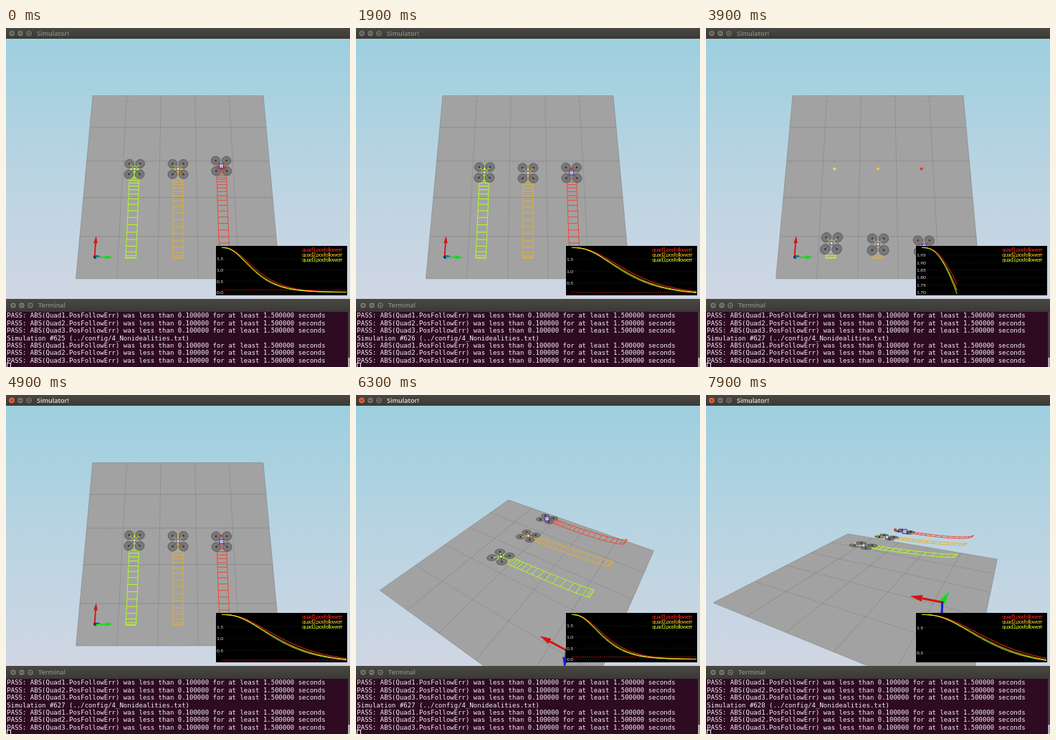
These frames come from a looping animation (480x473 px, 8000 ms). An HTML page with a canvas:

```html
<!DOCTYPE html>
<html lang="en">
<head>
<meta charset="utf-8">
<title>Simulator</title>
<style>
html, body { margin: 0; width: 100%; height: 100%; overflow: hidden; background: #300a24; }
canvas { display: block; }
</style>
</head>
<body>
<canvas id="stage" width="480" height="473"></canvas>
<script>
const ctx = document.getElementById('stage').getContext('2d');
const LOOP = 8000, TAU = Math.PI * 2;
const RUNS = [-2560, 546, 3620, 6797];      // start of each simulation run, ms
const RATE = 0.175, PLOT_W = 174, RUN_MAX = 385;
const FOCUS_AT = 4900;

// time, yaw, ground pitch, flight pitch (degrees)
const CAMERA = [
  [4900, 0, 75.2, 75.2], [5600, 34, 65, 65], [6350, 58, 36, 28],
  [7100, 62.5, 24.5, 15], [7900, 63, 18.8, 10.5]
];
const QUADS = [
  { u: 1, k: 0.0247, sag: 0.08, over: 0.08, hub: 6, color: '#f2452e', plot: '#ff2a1a' },
  { u: 0, k: 0.0265, sag: 0.03, over: 0, hub: 4, color: '#e6b02c', plot: '#ffc81e' },
  { u: -1, k: 0.0275, sag: 0.03, over: 0, hub: 4, color: '#b4ff1e', plot: '#d2ff1e' }
];
// range limit, first tick below 2, step between ticks
const TICKS = [
  [0.12, 0.02, 0.02], [0.35, 0.05, 0.05], [0.7, 0.1, 0.2],
  [1.55, 0.5, 0.5], [1.9, 0.5, 1], [9, 0.5, 0.5]
];

const clamp = x => Math.max(0, Math.min(1, x));
const smooth = x => { x = clamp(x); return x * x * (3 - 2 * x); };

function cameraAt(t) {
  let i = 0;
  while (i < CAMERA.length - 2 && t > CAMERA[i + 1][0]) i++;
  const a = CAMERA[i], b = CAMERA[i + 1];
  const f = clamp((t - a[0]) / (b[0] - a[0]));
  const [yaw, ground, air] = [1, 2, 3].map(j => (a[j] + (b[j] - a[j]) * f) * Math.PI / 180);
  return { ground: projector(yaw, ground), air: projector(yaw, air) };
}

// Orbit camera around the middle target; w is height relative to it.
function projector(yaw, pitch) {
  const c = Math.cos(yaw), s = Math.sin(yaw), cp = Math.cos(pitch), sp = Math.sin(pitch);
  return (u, v, w) => {
    const x = u * c - v * s, y = u * s + v * c;
    const scale = 370 / (6.1 + y * cp - w * sp);
    return [240 + x * scale, 196.5 - (y * sp + w * cp) * scale, scale];
  };
}

function path(points, close) {
  ctx.beginPath();
  points.forEach(p => ctx.lineTo(p[0], p[1]));
  if (close) ctx.closePath();
}
function line(points, color, width) {
  path(points);
  ctx.strokeStyle = color;
  ctx.lineWidth = width;
  ctx.stroke();
}
function dot(x, y, r, color) {
  ctx.beginPath();
  ctx.arc(x, y, r, 0, TAU);
  ctx.fillStyle = color;
  ctx.fill();
}
function text(str, x, y, font, color, align = 'left') {
  ctx.font = font;
  ctx.fillStyle = color;
  ctx.textAlign = align;
  ctx.fillText(str, x, y);
}

// Third-order critically damped approach
const error = (q, s) => { const x = q.k * s; return 2 * (1 + x + x * x / 2) * Math.exp(-x); };
function pose(q, s) {
  const x = q.k * s, e = Math.exp(-x);
  return {
    v: -0.975 * error(q, s) + q.over * smooth((s - 140) / 180),
    w: -q.sag * x * x * e / 0.54,
    tilt: 2.2 * (x - x * x / 2) * e
  };
}

function drawFloor(proj) {
  const at = (u, v) => proj(u, v, -1.07), h = 2.5;
  path([at(-h, h), at(h, h), at(h, -h), at(-h, -h)], true);
  ctx.fillStyle = '#a2a2a2';
  ctx.fill();
  ctx.strokeStyle = '#8f9092';
  ctx.lineWidth = 0.8;
  ctx.stroke();
  for (let g = -1.5; g < 2; g++) {
    line([at(-h, g), at(h, g)], 'rgba(112,112,112,.6)', 0.7);
    line([at(g, -h), at(g, h)], 'rgba(112,112,112,.45)', 0.7);
  }
}

function drawTrail(proj, q, s) {
  const left = [], right = [];
  const add = r => {
    const p = pose(q, r);
    left.push(proj(q.u - 0.11, p.v, p.w));
    right.push(proj(q.u + 0.11, p.v, p.w));
  };
  for (let r = 0; r < s - 10; r += 11) add(r);
  left.forEach((p, i) => line([p, right[i]], q.color, 1));
  line(left, q.color, 0.9);
  line(right, q.color, 0.9);
}

function drawQuad(proj, q, s) {
  const { v, w, tilt } = pose(q, s);
  const c = Math.cos(tilt), n = Math.sin(tilt);
  const at = (du, dv) => proj(q.u + du, v + dv * c, w - dv * n);
  const hub = at(0, 0), arm = 0.125;
  for (const dv of [arm, -arm]) for (const du of [-arm, arm]) {
    const rim = Array.from({ length: 18 }, (_, i) =>
      at(du + 0.105 * Math.cos(i * TAU / 18), dv + 0.105 * Math.sin(i * TAU / 18)));
    path(rim, true);
    ctx.fillStyle = 'rgba(112,112,114,.85)';
    ctx.fill();
    ctx.strokeStyle = '#5c5c60';
    ctx.lineWidth = 0.9;
    ctx.stroke();
  }
  for (const dv of [arm, -arm]) for (const du of [-arm, arm]) {
    const tip = at(du, dv);
    line([hub, tip], dv > 0 ? q.color : '#55555a', 1);
    dot(tip[0], tip[1], 1.2, '#2c2c30');
  }
  const r = q.hub / 2;
  ctx.fillStyle = q.hub > 5 ? '#b9b4e0' : '#f0ecd8';
  ctx.fillRect(hub[0] - r, hub[1] - r, q.hub, q.hub);
  ctx.strokeStyle = q.hub > 5 ? '#453a86' : '#54506a';
  ctx.lineWidth = 1;
  ctx.strokeRect(hub[0] - r, hub[1] - r, q.hub, q.hub);
}

function drawArrow(from, to, color) {
  const dx = to[0] - from[0], dy = to[1] - from[1], len = Math.hypot(dx, dy) || 1;
  const head = Math.min(len, 0.17 * from[2]), half = 0.045 * from[2];
  const ux = dx / len, uy = dy / len;
  const bx = to[0] - ux * head, by = to[1] - uy * head;
  line([from, [bx, by]], color, 0.03 * from[2]);
  path([to, [bx - uy * half, by + ux * half], [bx + uy * half, by - ux * half]], true);
  ctx.fillStyle = color;
  ctx.fill();
}

function drawAxes(proj) {
  const o = proj(-1.9, -1.96, -0.45);
  drawArrow(o, proj(-1.9, -1.96, -0.9), '#1420d8');
  drawArrow(o, proj(-1.9, -1.49, -0.45), '#d41414');
  drawArrow(o, proj(-1.48, -1.96, -0.45), '#10dc1c');
  dot(o[0], o[1], 1.8, '#24304c');
}

function drawScene(t, s) {
  ctx.save();
  ctx.beginPath();
  ctx.rect(0, 15, 480, 363);
  ctx.clip();
  const sky = ctx.createLinearGradient(0, 15, 0, 378);
  sky.addColorStop(0, '#9dcfdf');
  sky.addColorStop(0.5, '#b9d4e2');
  sky.addColorStop(1, '#d0d6e3');
  ctx.fillStyle = sky;
  ctx.fillRect(0, 15, 480, 363);
  const { ground, air } = cameraAt(t);
  drawFloor(ground);
  drawAxes(air);
  for (const q of QUADS) {
    drawTrail(air, q, s);
    const p = air(q.u, 0, 0);
    dot(p[0], p[1], 2, q.plot);
  }
  for (const q of QUADS) drawQuad(air, q, s);
  ctx.restore();
}

function drawPlot(s) {
  ctx.fillStyle = '#000';
  ctx.fillRect(293, 304, 183, 69);
  const least = error(QUADS[2], s);
  const low = least - 0.08 * Math.max(0, 1 - least * 4);
  const range = Math.max(0.01, 2 - low);
  const px = r => 301 + r * PLOT_W / Math.max(PLOT_W, s);
  const py = e => 306.5 + (2 - e) * 64.5 / range;

  const [, first, step] = TICKS.find(k => range < k[0]);
  for (let drop = first; drop < range - 0.02 * range; drop += step) {
    const y = py(2 - drop);
    if (y > 369) break;
    ctx.setLineDash([1, 2]);
    line([[303, y], [475, y]], '#303030', 0.7);
    ctx.setLineDash([]);
    text((2 - drop).toFixed(step < 0.1 ? 2 : 1), 294, y + 2.4, '6.5px Lato, sans-serif', '#e8e8e8');
  }
  if (low < 0.1) {
    ctx.setLineDash([2, 1]);
    line([[301, py(0.1)], [475, py(0.1)]], '#b01a14', 0.9);
    ctx.setLineDash([]);
  }
  for (const q of QUADS) {
    const pts = [];
    for (let i = 0; i <= 80; i++) pts.push([px(s * i / 80), py(error(q, s * i / 80))]);
    line(pts, q.plot, 1);
  }
  ctx.letterSpacing = '-0.5px';
  QUADS.forEach((q, i) =>
    text(`quad${i + 1}.posfollowerr`, 469, 312.3 + i * 7, '7.6px Lato, sans-serif', q.plot, 'right'));
  ctx.letterSpacing = '0px';
}

function drawBar(y, h, x, title, focused) {
  const g = ctx.createLinearGradient(0, y, 0, y + h);
  g.addColorStop(0, '#4a4843');
  g.addColorStop(1, '#3a3935');
  ctx.fillStyle = g;
  ctx.fillRect(0, y, 480, h);
  const cy = y + h / 2;
  for (let i = 0; i < 3; i++) {
    const cx = x + i * 12;
    dot(cx, cy, 4.6, '#302f2b');
    dot(cx, cy, 4, focused && !i ? '#e8603a' : '#74716a');
    const ink = '#3a3935';
    if (i === 0) {
      line([[cx - 1.6, cy - 1.6], [cx + 1.6, cy + 1.6]], ink, 0.9);
      line([[cx - 1.6, cy + 1.6], [cx + 1.6, cy - 1.6]], ink, 0.9);
    } else if (i === 1) {
      line([[cx - 2, cy], [cx + 2, cy]], ink, 0.9);
    } else {
      ctx.strokeStyle = ink;
      ctx.strokeRect(cx - 1.6, cy - 1.6, 3.2, 3.2);
    }
  }
  text(title, x + 35, cy + 3.4, '600 9px "Open Sans", sans-serif', focused ? '#e6e2da' : '#8f8b83');
}

function drawTerminal(run) {
  drawBar(378, 18, 10, 'Terminal', false);
  ctx.fillStyle = '#2e0a23';
  ctx.fillRect(0, 396, 480, 77);
  const pass = [1, 2, 3].map(n =>
    `PASS: ABS(Quad${n}.PosFollowErr) was less than 0.100000 for at least 1.500000 seconds`);
  const lines = [...pass, `Simulation #${625 + run} (../config/4_Nonidealities.txt)`, ...pass];
  lines.forEach((str, i) =>
    text(str, 1.3, 404.3 + i * 10.4, '9px "DejaVu Sans Mono", monospace', '#f4f2f3'));
  ctx.strokeStyle = '#f4f2f3';
  ctx.lineWidth = 1;
  ctx.strokeRect(1.5, 467.5, 5, 8);
  ctx.fillStyle = '#4a3a44';
  ctx.fillRect(477, 396, 3, 77);
  ctx.fillStyle = '#d8d0d4';
  ctx.fillRect(477.5, 460, 2, 13);
}

function frame(now) {
  const t = now % LOOP;
  let run = RUNS.length - 1;
  while (t < RUNS[run]) run--;
  const s = Math.min(RUN_MAX, (t - RUNS[run]) * RATE);
  drawScene(t, s);
  drawPlot(s);
  drawBar(0, 15, 8, 'Simulator!', t >= FOCUS_AT);
  drawTerminal(run);
  requestAnimationFrame(frame);
}
requestAnimationFrame(frame);
</script>
</body>
</html>
```
